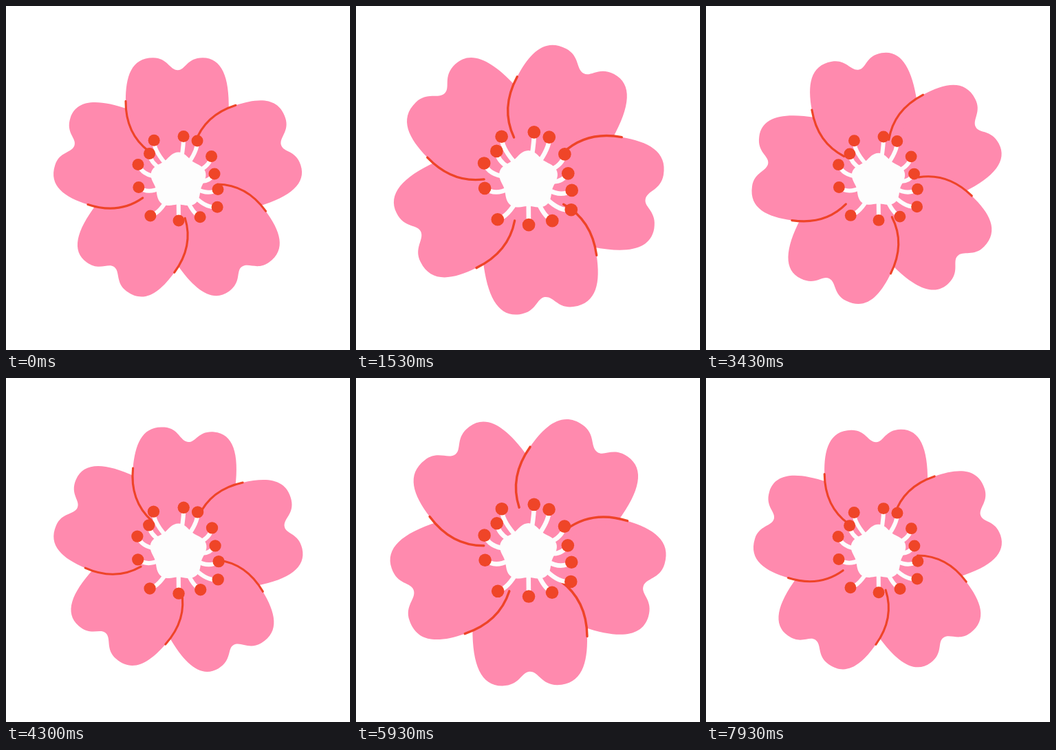
An HTML page for the animation above (8010 ms loop, 500 px wide and 500 px high).

```html
<!DOCTYPE html>
<html lang="en">
<head>
<meta charset="utf-8">
<title>Blossom</title>
<style>
  html, body { margin: 0; width: 100%; height: 100%; overflow: hidden; background: #fff; }
  svg { display: block; width: 100vw; height: 100vh; }
  #petals { fill: #ff8aae; }
  #creases { fill: none; stroke: #ee4428; stroke-width: 3.1; stroke-linecap: round; }
  #stems { fill: none; stroke: #fdfdfd; stroke-width: 6; stroke-linecap: round; }
  #tips { fill: #ef4528; }
  #heart { fill: #fdfdfd; }
</style>
</head>
<body>
<svg viewBox="0 0 500 500">
  <g id="flower">
    <g id="petals"></g>
    <g id="creases"></g>
  </g>
  <g id="stamens">
    <g id="stems"></g>
    <g id="tips"></g>
  </g>
  <path id="heart"/>
</svg>
<script>
  const LOOP = 8010, STEPS = 160, BEAT = 80, TURN = 144;
  const TAU = 2 * Math.PI;
  const $ = id => document.getElementById(id);

  function add(parent, tag, attrs) {
    const el = document.createElementNS('http://www.w3.org/2000/svg', tag);
    for (const key in attrs) el.setAttribute(key, attrs[key]);
    $(parent).append(el);
  }

  // Point at a clockwise angle from the top.
  const polar = (angle, r) => [r * Math.sin(angle), -r * Math.cos(angle)];

  const crease = 'M-42-40C-66-58-76-84-75.8-113';
  const petal = crease + 'C-76-148-68-176-36-176C-15-176-12-158 0-158' +
    'C11-158 13-176 36-176C64-176 75-148 74-100L0 0Z';

  for (let i = 0; i < 5; i++) {
    const transform = `rotate(${i * 72})`;
    add('petals', 'path', { d: petal, transform });
    add('creases', 'path', { d: crease, transform });
  }

  // Stamen tips as angle in degrees and radius; every stem droops downwards.
  const tips = [
    [-32.4, 66], [7, 62], [26.6, 61.5], [56, 58], [82.4, 53], [105, 59.5], [126, 70],
    [150.4, 64], [179.5, 61], [217, 67.5], [257.7, 59], [289.3, 62], [311, 55.6]
  ];
  for (const [deg, r] of tips) {
    const angle = deg / 360 * TAU;
    const root = angle + 0.26 * Math.sin(angle);
    const [cx, cy] = polar(angle, r);
    add('stems', 'path', { d: `M${cx} ${cy}Q${polar(root, r * 0.84)} ${polar(root, 30)}` });
    add('tips', 'circle', { cx, cy, r: 8.5 });
  }

  // Five soft bumps around a disc.
  const rim = Array.from({ length: 90 }, (_, i) => {
    const angle = i / 90 * TAU;
    const [x, y] = polar(angle, 38 + 3.3 * Math.cos(5 * angle));
    return [x, y + 2.8];
  });
  $('heart').setAttribute('d', `M${rim.join('L')}Z`);

  const swell = (step, peak) => 0.95 + 0.05 * Math.cos((step - peak) / BEAT * TAU);

  function place(id, x, y, step, peak, turn = 0) {
    const scale = swell(step, peak) / swell(0, peak);
    $(id).setAttribute('transform',
      `translate(${x} ${y}) rotate(${turn}) scale(${scale})`);
  }

  // Steps alternate between 30 ms and 70 ms.
  function stepAt(ms) {
    const t = ms % LOOP;
    return Math.min(STEPS - 1, 2 * Math.floor(t / 100) + (t % 100 >= 30 ? 1 : 0));
  }

  function draw(step) {
    place('flower', 249.8, 251.3, step, 40, step * TURN / STEPS);
    place('stamens', 250.5, 251, step, 32);
    place('heart', 250.5, 251, step, 24);
  }

  const start = performance.now();
  function tick() {
    draw(stepAt(performance.now() - start));
    requestAnimationFrame(tick);
  }
  tick();
</script>
</body>
</html>
```
